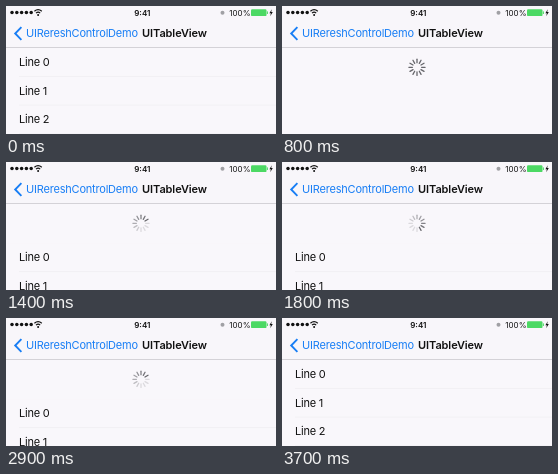
Write an HTML page that moves like this. It is 270x128 px and loops after 4.1 s.

```html
<!DOCTYPE html>
<html lang="en">
<head>
<meta charset="utf-8">
<title>Pull to refresh</title>
<style>
  html, body { margin: 0; width: 100%; height: 100%; overflow: hidden; background: #f9f7fb; }
  svg { display: block; width: 270px; height: 128px; }
  text { font: 11px Inter, "Liberation Sans", sans-serif; letter-spacing: -.25px; fill: #111; }
  .title { font-weight: 600; letter-spacing: -.1px; }
  .link { fill: #187ef5; letter-spacing: -.2px; }
  .status { font-size: 8px; letter-spacing: 0; }
</style>
</head>
<body>
<svg viewBox="0 0 270 128">
  <rect width="270" height="128" fill="#f9f7fb"/>
  <g id="spinner" stroke="#66666b" stroke-width="1.3" stroke-linecap="round"></g>
  <g id="rows"><rect y="42" width="270" height="128" fill="#f9f7fb"/></g>

  <rect width="270" height="41.4" fill="#f8f6fa"/>
  <path d="M0 41.5H270" stroke="#cbc9cf" stroke-width=".8"/>
  <g id="signal" fill="#111"></g>
  <path d="M28.4 5.2q3.7-3.2 7.4 0M30 7.1q2.1-1.8 4.2 0" fill="none" stroke="#111" stroke-width="1.2"/>
  <circle cx="32.1" cy="8.9" r="1" fill="#111"/>
  <text class="status title" x="136.3" y="9.6" text-anchor="middle">9:41</text>
  <circle cx="216.5" cy="6.7" r="2" fill="#a0a0a4"/>
  <text class="status" x="223.3" y="9.6">100%</text>
  <rect x="245" y="3.3" width="15.5" height="6.8" rx="1.2" fill="#4cd964"/>
  <path d="M261.4 5.4v2.6" stroke="#4cd964"/>
  <path d="M265.8 3.2l-2.4 4h1.5l-.7 3 2.6-4.1h-1.6z" fill="#111"/>

  <path d="M15.4 21.2L9.2 27.5l6.2 6.3" fill="none" stroke="#187ef5" stroke-width="1.9"/>
  <text class="link" x="20" y="31">UIRereshControlDemo</text>
  <text class="title" x="136.1" y="31">UITableView</text>
</svg>
<script>
  const LOOP = 4100, STEP = 100, TICKS = 12, ROW = 28.7, TOP = 41.7;
  const PULLED = 86, RESTING = 39.2;
  const rows = document.getElementById('rows');
  const spinner = document.getElementById('spinner');

  function add(parent, tag, attrs, text = '') {
    const el = document.createElementNS('http://www.w3.org/2000/svg', tag);
    for (const key in attrs) el.setAttribute(key, attrs[key]);
    el.textContent = text;
    return parent.appendChild(el);
  }

  for (let i = 0; i < 5; i++)
    add(document.getElementById('signal'), 'circle', { cx: 6 + i * 4.8, cy: 6.6, r: 1.75 });

  for (let i = 0; i < 3; i++) {
    const y = TOP + i * ROW;
    add(rows, 'text', { x: 13, y: y + 18.3 }, 'Line ' + i);
    add(rows, 'path', { d: `M13 ${y + ROW}H270`, stroke: '#efedf1', 'stroke-width': .7 });
  }

  const ticks = Array.from({ length: TICKS }, (_, i) =>
    add(spinner, 'path', { d: 'M0 -4.6V-8.1', transform: `rotate(${i * 360 / TICKS})` }));

  const clamp = x => Math.min(1, Math.max(0, x));
  const progress = (t, from, to) => clamp((t - from) / (to - from));
  const smooth = x => x * x * (3 - 2 * x);
  const easeOut = x => 1 - (1 - x) ** 3;

  function pullOffset(t) {
    if (t < 900) return PULLED * smooth(progress(t, 100, 800));
    if (t < 3300) return PULLED + (RESTING - PULLED) * easeOut(progress(t, 850, 1350));
    return RESTING * (1 - smooth(progress(t, 3300, 3700)));
  }

  function draw(t) {
    const offset = pullOffset(t);
    rows.setAttribute('transform', `translate(0 ${offset})`);

    const spin = progress(t, 800, 1200);
    const head = Math.floor((t - 1800) / 125 + 5.5);
    ticks.forEach((tick, i) => {
      const shown = t < 800 ? clamp((offset - 18) / 56 * TICKS - i) : 1;
      const age = ((head - i) % TICKS + TICKS) % TICKS;
      const trail = Math.max(.2, 1 - age / 10);
      tick.setAttribute('opacity', shown * (1 - spin + spin * trail));
    });

    const end = progress(t, 3300, 3700);
    spinner.setAttribute('transform', `translate(135 61.3) rotate(${end * 120}) scale(${1 - end})`);
    spinner.setAttribute('opacity', 1 - end);
  }

  function tick(now) {
    draw(Math.floor(now % LOOP / STEP) * STEP);
    requestAnimationFrame(tick);
  }
  draw(0);
  requestAnimationFrame(tick);
</script>
</body>
</html>
```
